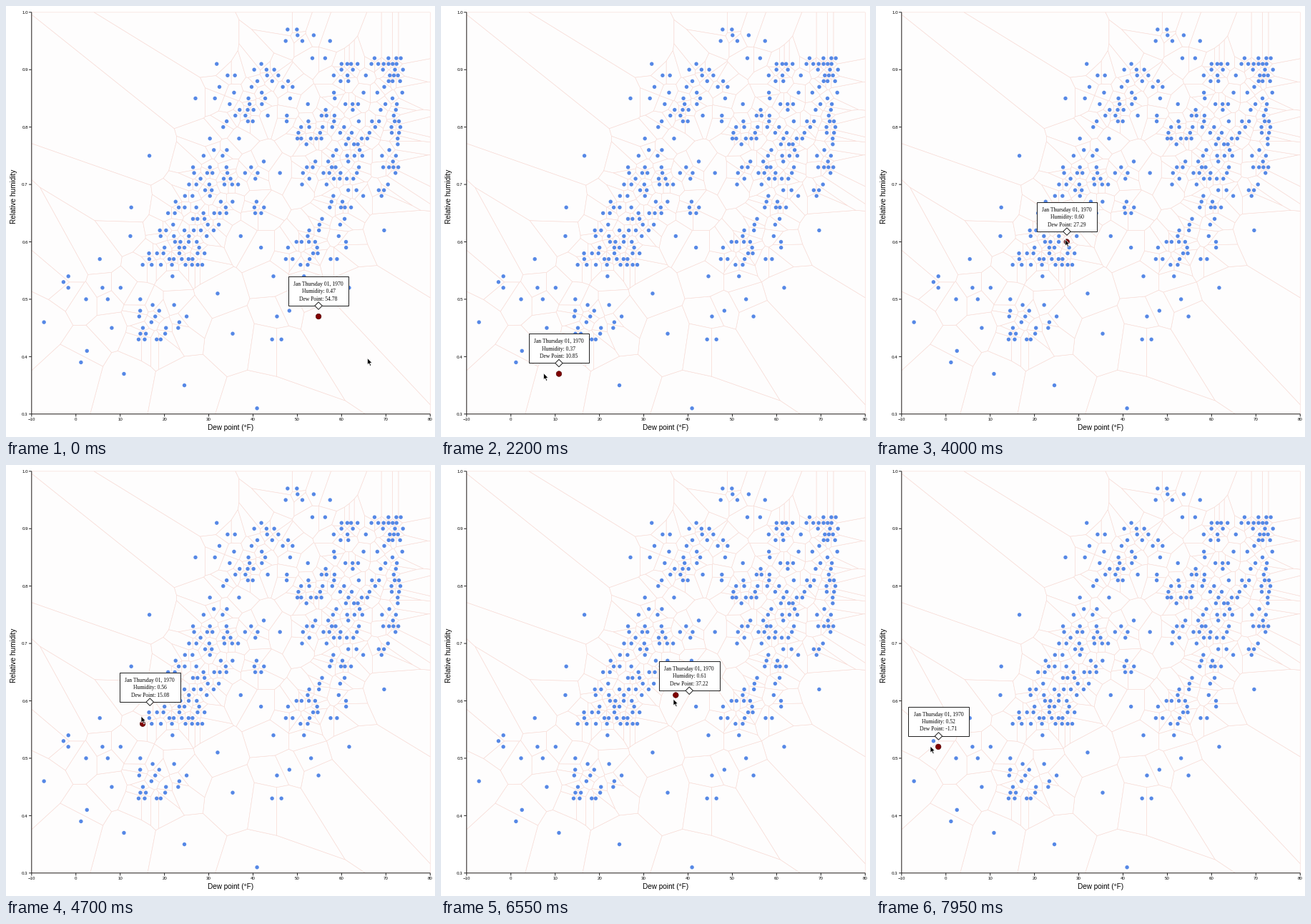
These frames come from a looping animation (600x604 px, 8000 ms). A matplotlib script:

```python
import random
import numpy as np
import matplotlib.pyplot as plt
from matplotlib.animation import FuncAnimation
from matplotlib.collections import EllipseCollection, PolyCollection
from matplotlib.patches import Circle, Polygon, Rectangle

W, H, DPI = 600, 604, 100
STEP, FRAMES = 50, 160
LEFT, RIGHT, TOP, BOTTOM = 35.8, 593.3, 8.8, 571.8
DOT_R, HOVER_R = 2.7, 3.8
FOLLOW = 0.5  # share of the remaining way the tooltip covers per frame
PT = 72 / DPI
SANS, SERIF = "Liberation Sans", "Liberation Serif"


def sx(dew):
    return LEFT + (dew + 10) / 90 * (RIGHT - LEFT)


def sy(percent):
    return BOTTOM - (percent - 30) / 70 * (BOTTOM - TOP)


# Outlying and hovered readings: dew point, humidity percent
KEYS = [
    (54.78, 47), (10.85, 37), (21.81, 54), (15.08, 56), (46.08, 72),
    (37.22, 61), (-1.71, 52), (-7.2, 46), (41.8, 59), (2.5, 41), (1.15, 39),
    (24.5, 35), (40.9, 31), (35.4, 44), (45.4, 47), (48.2, 48), (44.6, 54),
    (44.3, 43), (46.4, 43), (61.7, 52), (53.1, 50), (16.6, 75), (27, 85),
    (12.5, 66), (12.3, 61), (5.4, 57), (8.1, 45), (2.3, 50), (7.2, 50),
    (6, 52), (10.1, 52), (-2.8, 53), (-1.7, 54), (69.6, 62), (32, 51),
    (47.8, 97), (31.8, 91), (51.5, 54),
]

# Dense bands: count, start, end, half width in dew degrees
BANDS = [
    (20, (19, 43), (20, 50), 6),
    (78, (22, 55.5), (32, 73), 7),
    (22, (31, 74), (37, 90), 5),
    (9, (41, 65), (41, 76), 1.5),
    (20, (43, 80), (46, 92), 5),
    (34, (54, 56), (56, 70), 7),
    (26, (53, 71), (55, 85), 4),
    (82, (65, 68), (66, 92), 8),
    (18, (72, 72), (72, 93), 1.5),
    (9, (49, 97), (60, 90), 5),
]


def make_points():
    rng = random.Random(7)
    pts = list(KEYS)
    for count, a, b, half in BANDS:
        goal = len(pts) + count
        while len(pts) < goal:
            u = rng.random()
            dew = round(a[0] + u * (b[0] - a[0]) + rng.uniform(-half, half), 2)
            hum = round(a[1] + u * (b[1] - a[1]))
            gaps = [np.hypot(sx(dew) - sx(d), sy(hum) - sy(h)) for d, h in pts]
            if min(gaps) > 5.2 and min(gaps[:len(KEYS)]) > 9:
                pts.append((dew, hum))
    return np.array(pts)


def clip(poly, mid, normal):
    """Keep the part of poly behind the line through mid."""
    side = [np.dot(p - mid, normal) for p in poly]
    out = []
    for k, p in enumerate(poly):
        q, a, b = poly[k - 1], side[k], side[k - 1]
        if a * b < 0:
            out.append(q + (p - q) * b / (b - a))
        if a <= 0:
            out.append(p)
    return out


def voronoi(xy):
    box = [(LEFT, TOP), (RIGHT, TOP), (RIGHT, BOTTOM), (LEFT, BOTTOM)]
    cells = []
    for p in xy:
        poly = [np.array(c, float) for c in box]
        dist = np.hypot(*(xy - p).T)
        for j in np.argsort(dist)[1:]:
            reach = max(np.hypot(*(c - p)) for c in poly)
            if dist[j] > 2 * reach:
                break
            poly = clip(poly, (p + xy[j]) / 2, xy[j] - p)
        cells.append(np.array(poly))
    return cells


data = make_points()
dots = np.column_stack([sx(data[:, 0]), sy(data[:, 1])])

# Pointer path: time, x, y
PATH = np.array([
    (0, 505.5, 493.5), (900, 543, 490), (1050, 440, 515), (1350, 45, 465),
    (1450, 45, 465), (1600, 146, 517), (2200, 143.5, 514.5), (2600, 114, 491),
    (3000, 140, 485), (3200, 219.5, 388), (3450, 262, 350), (3850, 268, 330),
    (3950, 268, 330), (4500, 229, 296), (4700, 189, 352), (5500, 255, 231),
    (5650, 379.5, 229), (5900, 431, 231), (6400, 370, 352), (6550, 325, 328),
    (7250, 205, 395), (7350, 205, 395), (7700, 76, 394),
])
HOTSPOT = np.array([2, 2])


def make_track():
    """Pointer, hovered dot and tooltip anchor for each frame."""
    track, pos = [], None
    for n in range(FRAMES):
        cur = np.array([np.interp(n * STEP, PATH[:, 0], PATH[:, k]) for k in (1, 2)])
        hit = int(np.argmin(np.hypot(*(dots - cur - HOTSPOT).T)))
        pos = dots[hit] if pos is None else pos + FOLLOW * (dots[hit] - pos)
        track.append((cur, hit, pos))
    return track


track = make_track()

fig = plt.figure(figsize=(W / DPI, H / DPI), dpi=DPI, facecolor="white")
ax = fig.add_axes([0, 0, 1, 1])
ax.set_xlim(0, W)
ax.set_ylim(H, 0)
ax.axis("off")


def line(xs, ys):
    ax.plot(xs, ys, color="#222222", lw=PT, solid_capstyle="butt", snap=False)


def label(x, y, s, size, family=SANS, ha="center", va="baseline", **kw):
    return ax.text(x, y, s, fontsize=size * PT, color="black", family=family,
                   ha=ha, va=va, **kw)


ax.add_collection(PolyCollection(voronoi(dots), facecolor="#fefdfd",
                                 edgecolor="#f8dbd5", lw=0.6 * PT, zorder=1))
size = np.full(len(dots), 2 * DOT_R)
ax.add_collection(EllipseCollection(size, size, 0, units="xy", offsets=dots,
                                    offset_transform=ax.transData,
                                    facecolor="#5688e6", edgecolor="none", zorder=3))

line([LEFT, RIGHT], [BOTTOM, BOTTOM])
line([LEFT, LEFT], [TOP, BOTTOM])
for v in range(-10, 81, 10):
    line([sx(v)] * 2, [BOTTOM, BOTTOM + 3.7])
    label(sx(v), 581, str(v).replace("-", "\u2212"), 6.2)
for v in range(30, 101, 10):
    line([LEFT - 3.7, LEFT], [sy(v)] * 2)
    label(30.8, sy(v) + 2.2, f"{v / 100:.1f}", 6.2, ha="right")
label(314, 594.5, "Dew point (\u00b0F)", 10)
label(11.5, 267, "Relative humidity", 10, rotation=90, va="center")

hover = ax.add_patch(Circle((0, 0), HOVER_R, fc="#800000", ec="#4a0000",
                            lw=0.6 * PT, zorder=4))
frame = dict(fc="white", ec="#222222", lw=PT)
box = ax.add_patch(Rectangle((0, 0), 84.6, 41, zorder=5, **frame))
tip = ax.add_patch(Polygon([(0, 0)] * 3, closed=True, zorder=6, **frame))
lines = [label(0, 0, "", 7.6, family=SERIF, zorder=7) for _ in range(3)]
arrow = ax.add_patch(Polygon([(0, 0)] * 3, closed=True, fc="black", ec="white",
                             lw=0.7 * PT, zorder=8))

ARROW = np.array([(0, 0), (0, 9.2), (2.1, 7.3), (3.7, 10.9), (5.2, 10.2),
                  (3.7, 6.8), (6.4, 6.6)])
DIAMOND = np.array([(0, -5.2), (5.2, 0), (0, 5.2), (-5.2, 0)])


def draw(n):
    cur, hit, pos = track[n]
    dew, hum = data[hit]
    hover.center = tuple(dots[hit])
    x, y = pos[0], pos[1] - 15
    box.set_xy((x - 42.3, y - 41))
    tip.set_xy(DIAMOND + (x, y))
    rows = ("Jan Thursday 01, 1970", f"Humidity: {hum / 100:.2f}",
            f"Dew Point: {dew:.2f}")
    for k, (item, text) in enumerate(zip(lines, rows)):
        item.set_text(text)
        item.set_position((x, y - 28.3 + 10.4 * k))
    arrow.set_xy(ARROW + cur)
    return [hover, box, tip, *lines, arrow]


anim = FuncAnimation(fig, draw, frames=FRAMES, interval=STEP, repeat=True,
                     repeat_delay=0, blit=True)
plt.show()
```
